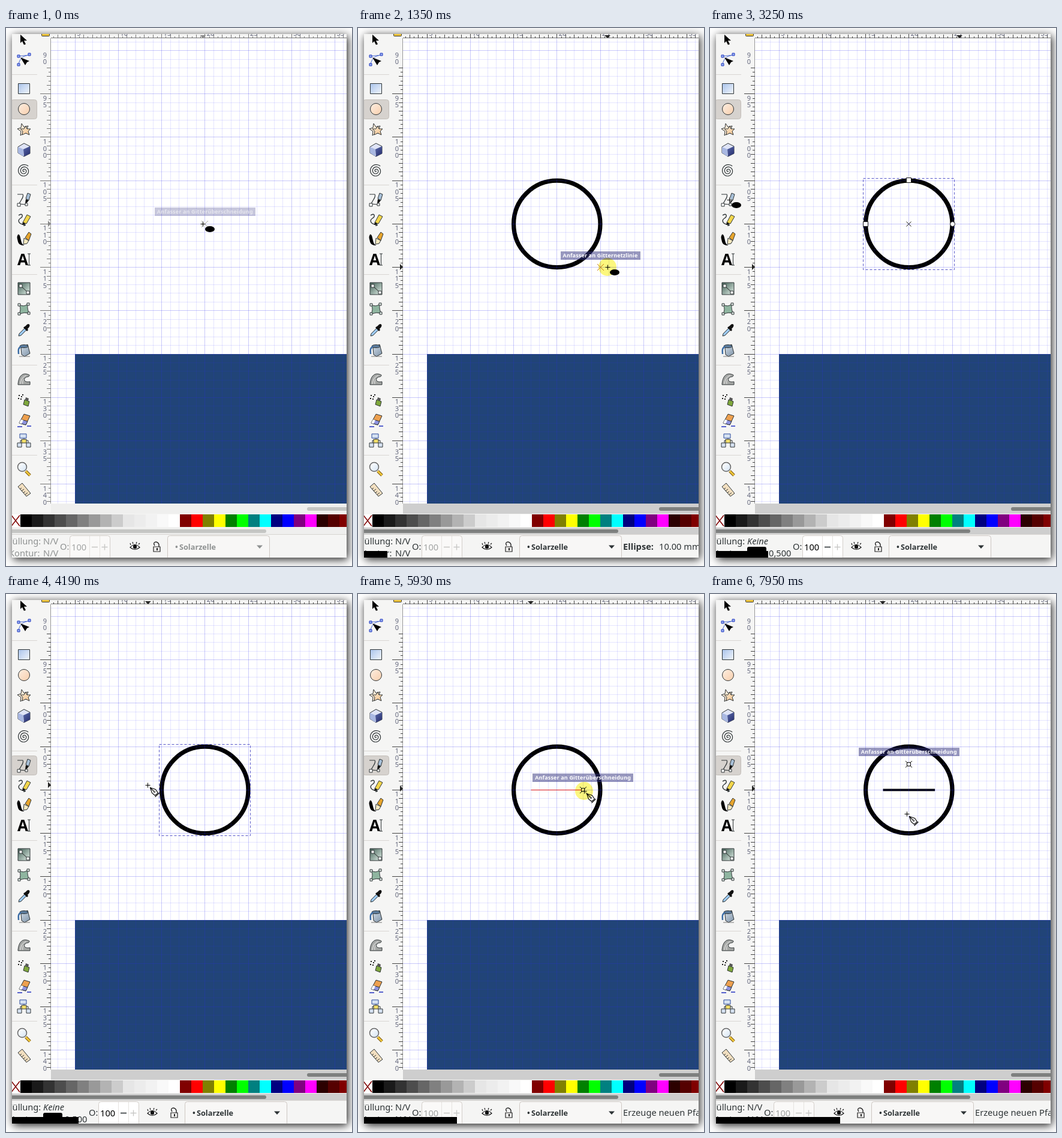
Animation of 577 by 896 pixels, one loop 8000 ms. Source, as an HTML page with a canvas:

```html
<!DOCTYPE html>
<html lang="de">
<head>
<meta charset="utf-8">
<title>Ellipse und Pfad zeichnen</title>
<style>
html, body { margin: 0; width: 100%; height: 100%; overflow: hidden; background: #fff; }
canvas { display: block; }
</style>
</head>
<body>
<canvas id="stage" width="577" height="896"></canvas>
<script>
const ctx = document.getElementById('stage').getContext('2d');
const LOOP = 8000, MM = 14.44, CX = 331.8, CY = 326.4;
const LEFT = 10, TOP = 10, RIGHT = 568, BOTTOM = 882;
const SANS = '"Noto Sans", sans-serif';
const INK = '#2e3436', CHROME = '#f5f5f4';
const CROSSING = 'Anfasser an Gitterüberschneidung';
const GRIDLINE = 'Anfasser an Gitternetzlinie';

// Pointer path: step, x, y
const PATH = [[-1, 328.5, 326], [2, 331, 327], [6, 399, 384], [9, 416, 398], [15, 416, 398],
  [20, 32, 286], [23, 32, 286], [28, 288, 326], [31, 288, 326], [32, 321, 330], [35, 377, 328],
  [40, 377, 328], [42, 343, 306], [44, 331, 283], [46, 331, 283], [48, 330, 331], [51, 328, 366]];
// Snap hints: first step, last step, x and y in mm from the centre, text, colour
const SNAPS = [[-1, 0, 0, 0, CROSSING, '#555'], [3, 7, -3, -3, GRIDLINE, '#a0522d'],
  [8, 16, 5, 5, GRIDLINE, '#c87820'], [28, 35, -3, 0, CROSSING, '#d01010'],
  [36, 44, 3, 0, CROSSING, '#111'], [45, 51, 0, -3, CROSSING, '#111']];
const PRESSED = [[2, 10], [22, 22], [30, 30], [38, 38], [46, 46]];
const PALETTE = ('000 1a1a1a 333 4d4d4d 666 808080 999 b3b3b3 ccc e6e6e6 ececec f2f2f2 f9f9f9 fff ' +
  '800000 f00 808000 ff0 008000 0f0 008080 0ff 000080 00f 800080 f0f 2b0000 500 800000').split(' ');

const within = (k, a, b) => k >= a && k <= b;
const crisp = v => Math.floor(v) + 0.5;

function stepAt(t) {
  if (t < 50) return -1;
  return t < 1170 ? Math.floor((t - 50) / 140) : 8 + Math.max(0, Math.floor((t - 1190) / 157.2));
}

function pointer(k) {
  let i = 0;
  while (i < PATH.length - 2 && PATH[i + 1][0] <= k) i++;
  const [k0, x0, y0] = PATH[i], [k1, x1, y1] = PATH[i + 1];
  const u = Math.min(1, (k - k0) / (k1 - k0));
  return [x0 + (x1 - x0) * u, y0 + (y1 - y0) * u];
}

// Diameter of the dragged circle in mm
function diameter(k) {
  return k < 2 ? 0 : Math.min(10, 1.93 * (k - 2));
}

function box(x, y, w, h, fill) {
  ctx.fillStyle = fill;
  ctx.fillRect(x, y, w, h);
}

function line(x0, y0, x1, y1, color, w = 1) {
  ctx.strokeStyle = color;
  ctx.lineWidth = w;
  ctx.beginPath();
  ctx.moveTo(x0, y0);
  ctx.lineTo(x1, y1);
  ctx.stroke();
}

function disc(x, y, rx, ry, fill, stroke, w = 1) {
  ctx.beginPath();
  ctx.ellipse(x, y, rx, ry, 0, 0, 7);
  if (fill) { ctx.fillStyle = fill; ctx.fill(); }
  if (stroke) { ctx.strokeStyle = stroke; ctx.lineWidth = w; ctx.stroke(); }
}

function round(x, y, w, h, r, fill, stroke) {
  ctx.beginPath();
  ctx.roundRect(x, y, w, h, r);
  if (fill) { ctx.fillStyle = fill; ctx.fill(); }
  if (stroke) { ctx.strokeStyle = stroke; ctx.lineWidth = 1; ctx.stroke(); }
}

function text(s, x, y, color, font = '14.67px', align = 'left') {
  ctx.font = font + ' ' + SANS;
  ctx.fillStyle = color;
  ctx.textAlign = align;
  ctx.fillText(s, x, y);
}

function shape(d, fill, stroke, w = 1) {
  const p = new Path2D(d);
  if (fill) { ctx.fillStyle = fill; ctx.fill(p); }
  if (stroke) { ctx.strokeStyle = stroke; ctx.lineWidth = w; ctx.stroke(p); }
}

function at(x, y, draw) {
  ctx.save();
  ctx.translate(x, y);
  draw();
  ctx.restore();
}

function blend(a, b) {
  const g = ctx.createLinearGradient(-9, -9, 9, 9);
  g.addColorStop(0, a);
  g.addColorStop(1, b);
  return g;
}

function spiral() {
  ctx.beginPath();
  for (let a = 0; a < 18; a += 0.2) ctx.lineTo(a * 0.6 * Math.cos(a), 1 + a * 0.6 * Math.sin(a));
  ctx.strokeStyle = INK;
  ctx.lineWidth = 1.2;
  ctx.stroke();
}

const ICONS = [
  [18, () => shape('M-6-7V7L-3 4 0 10 3 9 0 3H5Z', '#000')],
  [53, () => {
    shape('M-9 8C-8-1-2-7 9-8M-9-6L9-8', null, '#4a6ad0');
    shape('M-11 6h4v4h-4zM7-11h4v4h-4zM-11-8h4v4h-4z', '#9ab0f0', '#2038c0');
    shape('M-6-4L9 2 5 4 2 9Z', '#000');
  }],
  [101, () => shape('M-9.5-8.5h19v17h-19z', blend('#a9c3ea', '#f2f6fc'), INK)],
  [135, () => disc(0, 0, 9.5, 9.5, blend('#fdeee0', '#f8cfae'), INK)],
  [169, () => {
    shape('M-4-10L0-4 7-6 4 1 8 7 0 6-6 10-5 3-11-1-5-3Z', '#fdecd8', INK);
    shape('M3-6L5-1 11-1 7 3 9 9 3 6-3 9-2 3-6-1 0-1Z', blend('#fdecd8', '#f5c793'), INK);
  }],
  [203, () => {
    shape('M-10-5L0-11 10-6V6L0 11-10 5Z', '#dfe4f6', INK);
    shape('M-10-5L-1-1V11L-10 5Z', '#a9b8e2');
    shape('M-1-1L10-6V6L0 11Z', blend('#6d7fc0', '#2a3272'));
  }],
  [237, spiral],
  [286, () => {
    shape('M-11-9H-2C1-5-6 1-8 7L4 8', null, INK, 1.2);
    shape('M-11 6h5v5h-5zM2 6h4v4h-4z', '#fff', INK);
    shape('M2 6L3-1 8 1 5 5Z', '#111');
    shape('M3-2L6-11 11-9 8 1Z', '#a8c0d8', INK);
  }],
  [319, () => {
    shape('M-9-7C-2-12-1-5-6-2S-9 7-2 8 2 10-1 10', null, INK, 1.4);
    shape('M-2 5L5-8 11-5 4 7Z', '#f3d64b', INK);
    shape('M-3 9L-2 4 3 7Z', '#111');
  }],
  [352, () => {
    shape('M-10-8C-5-10-6 8-1 9S-8 12-10 4-12-4-10-8Z', '#000');
    shape('M-1 8L0-2 8 2 5 7Z', '#f5e9c0', INK);
    shape('M2-3L8-12 12-9 8 2Z', '#e7a52c', INK);
  }],
  [386, () => {
    text('A', -2, 9, '#000', 'bold 26px', 'center');
    shape('M6-10h5M8.5-10V9M6 9h5', null, INK);
  }],
  [434, () => {
    shape('M-10-10H10V10H-10Z', blend('#49665c', '#dcebe3'), INK);
    line(-6, -5, 6, 6, '#222');
    shape('M-8-7h5v5h-5zM4 4h5v5h-5z', '#fff', INK);
  }],
  [468, () => {
    shape('M-8-7Q0-3 6-8 5 1 9 7 1 5-8 8-4 0-8-7Z', '#8fb5a0', INK);
    shape('M-10-9h4v4h-4zM5-10h4v4h-4zM6 5h4v4h-4zM-10 6h4v4h-4z', '#dfe9e4', INK);
  }],
  [503, () => {
    shape('M-9 10L-8 6 2-4 5-1-5 9Z', '#9cc8ee', INK);
    shape('M0-5L3-7C7-13 12-9 8-4L6-2 7 0 5 2-1-4Z', '#111');
  }],
  [537, () => {
    shape('M-5-4L6-10 10 5 1 10-4 7Z', blend('#dbe4ee', '#8398ac'), INK);
    disc(0, -7, 7, 2.5, '#5d7d9e', INK);
    shape('M-5-6C-11-4-9 2-9 6', null, '#3b6ca5', 2.5);
    shape('M-8 10H10', null, '#777');
  }],
  [585, () => {
    shape('M-10 9C-9-8 0-12 9-7 9-2 3-6 1-1S5 5 10 4V9Z', '#a5a7a5', INK);
    shape('M-6 8C-5-1-1-5 4-6M-2 8C-3 3-1 1 0 0', null, '#eee');
  }],
  [619, () => {
    shape('M1 0L9 3 7 11-1 8Z', '#7fa83c', INK);
    shape('M3-4L8-2 7 2 2 0Z', '#555');
    shape('M-9-8h2v2h-2zM-5-6h2v2h-2zM-10-3h2v2h-2zM-6-2h2v2h-2zM-3-9h2v2h-2z', '#222');
  }],
  [653, () => {
    shape('M-8 5L0-10 10-7 3 8Z', '#eda04f', INK);
    shape('M-8 5L-5-1 6 2 3 8Z', '#8f94e0', INK);
    shape('M-8 5L-5-1-1 0-4 6Z', '#fff');
    shape('M-11 11H-3M5 10h7', null, '#2230c0', 1.5);
  }],
  [687, () => {
    shape('M0-4V1M-6 5V0H7V5', null, INK);
    shape('M-7-11H4V-4H-7Z', '#d6e2f2', '#2a4a9c');
    shape('M-4-2h8v6h-8z', '#f5e06a', INK);
    shape('M-11 4h7v7h-7zM4 4h7v7h-7z', '#d6e2f2', INK);
  }],
  [734, () => {
    shape('M3 4L10 11', null, '#7a5510', 5);
    shape('M3 4L10 11', null, '#f0c83a', 3);
    disc(-3, -3, 7.5, 7.5, blend('#fff', '#c2d8ee'), '#666', 1.5);
  }],
  [769, () => {
    shape('M-10-5L-3-11 11 6 4 11Z', '#f2dfc0', INK);
    shape('M-7-1l3-2M-4 2l4-3M-1 5l3-2M2 8l4-3', null, INK);
  }]
];

function toolbar(k) {
  box(LEFT, TOP, 65, 799, CHROME);
  for (const y of [78, 262, 411, 562, 712]) line(LEFT, y - 0.5, 52, y - 0.5, '#d9d6d3');
  round(8.5, k < 22 ? 119.5 : 269.5, 43, 32, 4, '#d6d2ce', '#c3beb9');
  for (const [y, draw] of ICONS) at(30, y, draw);
}

function rulers(k, live) {
  const ink = live ? '#444' : '#777';
  box(57, TOP, RIGHT - 57, 7, CHROME);
  line(75, 16.5, RIGHT, 16.5, '#777');
  line(74.5, 17, 74.5, 792, '#999');
  for (let i = -36; i < 66; i++) {
    const major = i % 10 === 0, len = major ? 18 : i % 2 ? 4 : 7;
    const x = crisp(CX + i * MM / 2), y = crisp(CY + i * MM / 2);
    if (x > 75 && x < RIGHT) line(x, 17 - Math.min(7, len - 1), x, 17, ink);
    if (y > 17 && y < 792) line(75 - len, y, 75, y, ink);
  }
  for (let i = -4; i <= 6; i++) {
    const digits = String(110 + i * 5);
    for (let j = 0; j < digits.length; j++) {
      text(digits[j], 65, CY + i * 5 * MM + 11 + j * 11.5, '#62667c', '11px', 'center');
    }
    if (i > -4 && i < 4) text(20 + i * 5, CX + i * 5 * MM + 3, 13, '#62667c', '11px');
  }
  round(59.5, 6.5, 13, 7, 1, '#f0c63c', '#333');
  const [x, y] = k < 11 ? pointer(k) : k < 25 ? [416, 398] : k < 29 ? pointer(k) : [288, 324];
  const mark = live ? '#222' : '#888';
  at(x, 17, () => shape('M-5-5H5L0 0Z', mark));
  at(75, y, () => shape('M-5-5V5L0 0Z', mark));
}

function grid() {
  for (let i = -21; i < 33; i++) {
    const color = i % 5 ? 'rgba(40,40,255,.12)' : 'rgba(40,40,235,.25)';
    const x = crisp(CX + i * MM), y = crisp(CY + i * MM);
    if (x > 75 && x < RIGHT) line(x, 17, x, 792, color);
    if (y > 17 && y < 792) line(75, y, RIGHT, y, color);
  }
}

function node(x, y, fill = '#fff') {
  round(crisp(x) - 3, crisp(y) - 3, 6, 6, 0, fill, '#111');
}

function drawing(k) {
  // The canvas redraws slightly behind the status text
  const r = diameter(k - 0.08) * MM / 2;
  const x0 = CX - 3 * MM, x1 = CX + 3 * MM;
  box(115, 543, RIGHT - 115, 249, '#214478');
  if (r) disc(CX, CY, r, r, null, '#000', 7.2);
  if (k >= 39) line(x0, CY, x1, CY, '#000', 3.8);
  grid();
  if (within(k, 36, 38)) line(x0, CY, x1, CY, '#e01818');
  if (within(k, 39, 45)) {
    ctx.setLineDash([4, 3]);
    line(x0, CY, x1, CY, '#26269a', 1.5);
    ctx.setLineDash([]);
    node(x0, CY);
    node(x1, CY);
  }
  if (within(k, 11, 29)) {
    ctx.setLineDash([4, 3]);
    round(255.5, 250.5, 152, 152, 0, null, '#5a5ac8');
    ctx.setLineDash([]);
  }
  if (within(k, 11, 21)) {
    round(327.5, 249.5, 8, 8, 0, '#fff', '#111');
    round(255.5, 322.5, 8, 8, 0, '#fff', '#111');
    disc(404.5, 326.5, 4, 4, '#fff', '#111');
    at(331.5, 326.5, () => shape('M-4-4L4 4M4-4L-4 4', null, '#111'));
  }
}

function snapHint(k) {
  const hint = SNAPS.find(s => within(k, s[0], s[1]));
  if (!hint) return;
  const [, , mx, my, label, color] = hint;
  const x = CX + mx * MM, y = CY + my * MM;
  ctx.save();
  if (k < 1) ctx.globalAlpha = 0.55;
  at(crisp(x), crisp(y), () => shape('M-5.5-5.5L5.5 5.5M5.5-5.5L-5.5 5.5', null, color));
  if (k >= 30) node(x, y, 'rgba(255,255,255,.75)');
  ctx.font = 'bold 9px ' + SANS;
  ctx.letterSpacing = '0.15px';
  const w = Math.round(ctx.measureText(label).width + 8);
  box(Math.round(x - w / 2), Math.round(y) - 27, w, 14, 'rgba(51,51,127,.5)');
  text(label, x, Math.round(y) - 17, '#fff', 'bold 9px', 'center');
  ctx.restore();
}

function cursor(k) {
  const [x, y] = pointer(k);
  at(crisp(x), crisp(y), () => {
    shape('M-4 0H4M0-4V4', null, '#fff', 2.4);
    shape('M-4 0H4M0-4V4', null, '#000');
    if (k < 24) {
      disc(11.5, 8.5, 8, 5, '#000');
    } else {
      shape('M4 4L13 7 17 13 12 17 7 13Z', '#fff', '#000', 1.1);
      shape('M4 4L10 10M12 19.5L19 13', null, '#000', 1.1);
      disc(11, 11, 1.2, 1.2, null, '#000');
    }
  });
  if (PRESSED.some(p => within(k, p[0], p[1]))) {
    ctx.save();
    ctx.globalCompositeOperation = 'multiply';
    disc(x, y, 15, 15, '#fcf77e');
    ctx.restore();
  }
}

function scrollbars(live) {
  const trough = live ? '#cecece' : '#efefee', thumb = live ? '#7e807f' : '#c5c6c4';
  box(75, 792, RIGHT - 75, 17, trough);
  round(502, 798, 80, 6, 3, thumb);
  box(LEFT, 832, RIGHT - LEFT, 12, trough);
  round(0, 835, 434, 6, 3, thumb);
}

function palette() {
  box(LEFT, 809, RIGHT - LEFT, 23, CHROME);
  box(LEFT, 810, 14, 21, '#fff');
  at(16, 820.5, () => shape('M-7-9L7 9M7-9L-7 9', null, '#800000', 1.6));
  PALETTE.forEach((c, i) => box(24 + i * 19, 810, 19, 21, '#' + c));
}

function opacity(x, on, fg) {
  const ink = on ? '#000' : '#a3a5a4';
  text('O:', x, 869, fg);
  round(x + 16.5, 845.5, 67, 40, 4, on ? '#fff' : '#faf9f8', '#d3cec9');
  line(x + 49.5, 846, x + 49.5, BOTTOM, '#e6e3e0');
  line(x + 66.5, 846, x + 66.5, BOTTOM, '#e6e3e0');
  text('100', x + 19, 869.5, ink);
  line(x + 53, 864.5, x + 63, 864.5, on ? INK : '#c8c8c6', 1.6);
  at(x + 74.5, 864.5, () => shape('M-5 0H5M0-5V5', null, '#c8c8c6', 1.4));
}

function layerBox(dx, fg) {
  at(215 + dx, 864, () => {
    shape('M-8 1Q0-8 8 1 0 8-8 1Z', '#fff', '#111', 1.2);
    disc(0, 0, 3.2, 3.2, '#111');
    shape('M-7-3L-8-6M-3-5L-4-8M2-5L3-8M6-4L8-6', null, '#111', 1.1);
  });
  at(251 + dx, 864, () => {
    shape('M-5 0h11v8h-11z', '#f4f3f1', '#222', 1.2);
    shape('M-3-2C-8-8 2-11 4-4V0', null, '#222', 1.4);
    box(0, 2, 2, 4, '#222');
  });
  round(269.5 + dx, 845.5, 170, 40, 4, '#f8f7f6', '#cdc7c2');
  text('•', 282 + dx, 868.5, fg, 'bold 12.7px');
  text('Solarzelle', 289 + dx, 868.5, fg, 'bold 12.7px');
  at(423 + dx, 864, () => shape('M-5-2.5H5L0 3Z', fg));
}

function message(k, x) {
  if (within(k, 3, 10)) {
    text('Ellipse:', x, 869, INK, 'bold 14.67px');
    text(diameter(k).toFixed(2) + ' mm', 502, 869, INK);
  } else if (within(k, 39, 45)) {
    text('Zeichnen beendet', x, 869, INK);
  } else if (k >= 30) {
    text('Erzeuge neuen Pfad', x, 869, INK);
  }
}

function statusBar(k, live) {
  const fg = live ? INK : '#8f9292';
  const picked = within(k, 11, 29) || within(k, 39, 45);
  const dx = picked ? 29 : 0;
  box(LEFT, 843, RIGHT - LEFT, BOTTOM - 843, CHROME);
  line(LEFT, 843.5, RIGHT, 843.5, '#d8d5d2');
  text('Füllung:', 3, 860, fg);
  text('Kontur:', 5, 880, fg);
  if (picked) {
    text('Keine', 62, 860, fg, 'italic 14.67px');
    round(62, 864, 32, 20, 3, '#000');
    text(k < 30 ? '0,500' : '0,265', 98, 880, fg);
  } else {
    text('N/V', 62, 860, fg);
    text('N/V', 62, 880, fg);
  }
  opacity(picked ? 138 : 90, picked, fg);
  layerBox(dx, fg);
  message(k, 442 + dx);
  if (k >= 0) box(LEFT, 871, 3 + 4 * k, BOTTOM - 871, '#000');
}

function render(k) {
  const live = k >= 1;
  ctx.clearRect(0, 0, 577, 896);
  ctx.save();
  ctx.shadowColor = 'rgba(0,0,0,.9)';
  ctx.shadowBlur = 14;
  ctx.shadowOffsetX = 2;
  ctx.shadowOffsetY = 3;
  box(LEFT, TOP, RIGHT - LEFT, BOTTOM - TOP, '#fff');
  ctx.restore();

  ctx.save();
  ctx.beginPath();
  ctx.rect(LEFT, TOP, RIGHT - LEFT, BOTTOM - TOP);
  ctx.clip();
  drawing(k);
  snapHint(k);
  toolbar(k);
  rulers(k, live);
  scrollbars(live);
  palette();
  statusBar(k, live);
  cursor(k);
  ctx.restore();
}

const start = performance.now();
let shown = null;
function tick() {
  const k = stepAt((performance.now() - start) % LOOP);
  if (k !== shown) render(shown = k);
  requestAnimationFrame(tick);
}
tick();
</script>
</body>
</html>
```
